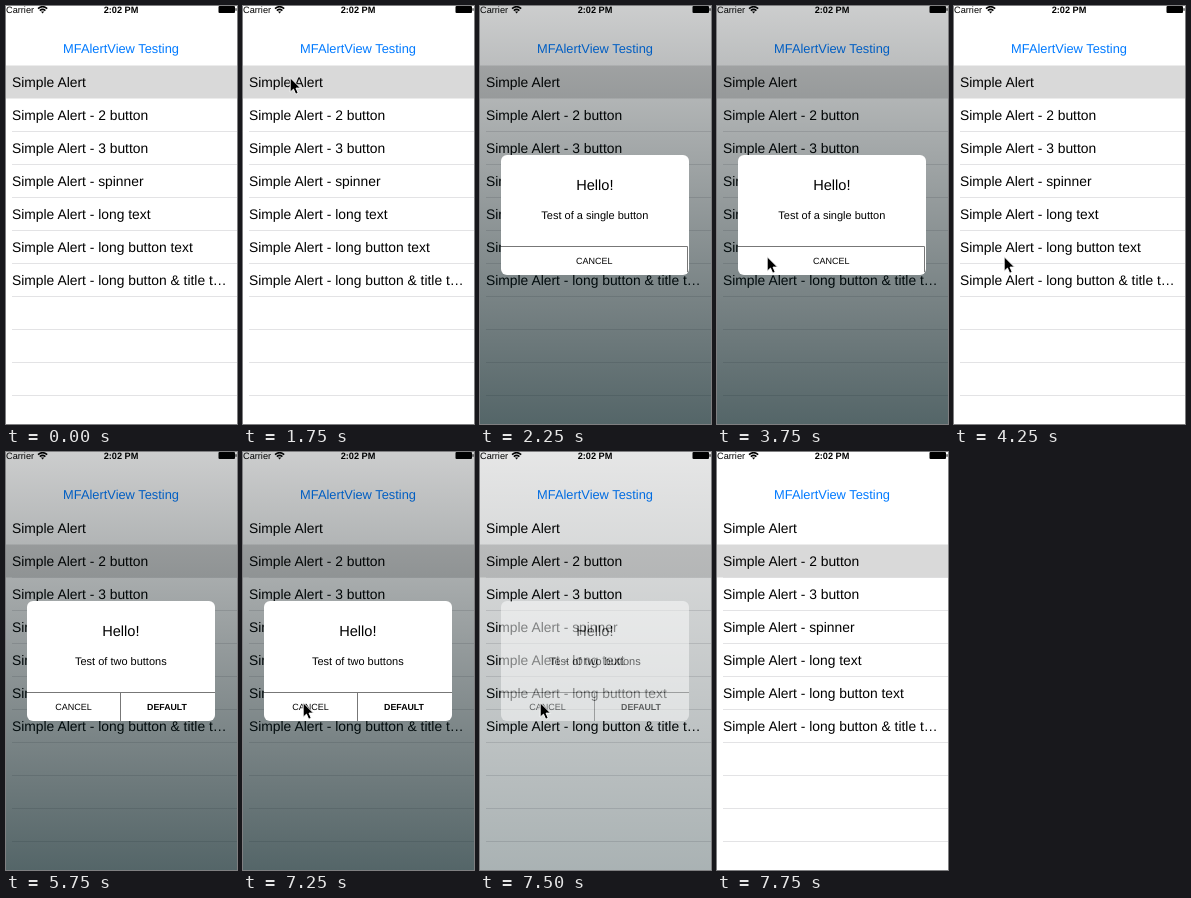
Write an HTML page that moves like this. It is 231x418 px and loops after 8 s.

```html
<!DOCTYPE html>
<html lang="en">
<head>
<meta charset="utf-8">
<title>Alert view demo</title>
<style>
  html, body { margin: 0; width: 100%; height: 100%; overflow: hidden; background: #fff; }
  svg { display: block; width: 231px; height: 418px; }
  text { font-family: "Liberation Sans", Arial, sans-serif; text-rendering: geometricPrecision; }
  .mid { text-anchor: middle; }
  .bold { font-weight: bold; }
</style>
</head>
<body>
<svg viewBox="0 0 231 418">
  <defs>
    <linearGradient id="shade" x1="0" y1="0" x2="0" y2="1">
      <stop offset="0" stop-color="#000608" stop-opacity=".2"/>
      <stop offset="1" stop-color="#001a1e" stop-opacity=".67"/>
    </linearGradient>
  </defs>
  <rect width="231" height="418" fill="#fff"/>
  <text x="0" y="7" font-size="9.2">Carrier</text>
  <g fill="none" stroke="#000" stroke-width="1.5">
    <path d="M32 2.6Q36.6 -1.4 41.2 2.6M33.8 4.6Q36.6 2.2 39.4 4.6"/>
    <path d="M35 5.6h3.2L36.6 7.4Z" fill="#000" stroke="none"/>
  </g>
  <text class="mid bold" x="115" y="7" font-size="9.2">2:02 PM</text>
  <rect x="212.5" width="16.5" height="7" rx="1"/>
  <rect x="229.5" y="2.2" width="1" height="2.6"/>
  <text class="mid" x="115" y="47" font-size="12.85" fill="#007aff">MFAlertView Testing</text>
  <g id="lines"></g>
  <rect id="highlight" width="231" height="33" fill="#d9d9d9"/>
  <g id="labels" font-size="13.85"></g>
  <rect id="dim" width="231" height="418" fill="url(#shade)"/>
  <g id="alert">
    <rect x="21" y="149" width="188" height="120" rx="6" fill="#fff"/>
    <text class="mid" x="114.8" y="184" font-size="14.6">Hello!</text>
    <text class="mid" id="message" x="114.8" y="213" font-size="11"></text>
    <path id="rules" fill="none" stroke="#777"/>
    <text class="mid" id="cancel" y="258" font-size="9">CANCEL</text>
    <text class="mid bold" id="default" x="161" y="258" font-size="8.8">DEFAULT</text>
  </g>
  <path id="cursor" d="M.7.7V15.2L4 12.1L6.2 17.2L8.7 16.1L6.5 11.1H11Z" stroke="#fff" stroke-width=".9"/>
</svg>
<script>
const LOOP = 8000, STEP = 250, ROW_TOP = 59, ROW_HEIGHT = 33;
const $ = id => document.getElementById(id);
const clamp = x => Math.max(0, Math.min(1, x));
const easeOut = u => 1 - (1 - u) ** 4;

function add(parent, tag, attrs, text = '') {
  const node = document.createElementNS('http://www.w3.org/2000/svg', tag);
  for (const key in attrs) node.setAttribute(key, attrs[key]);
  node.textContent = text;
  parent.append(node);
}

const rows = ['', ' - 2 button', ' - 3 button', ' - spinner', ' - long text',
  ' - long button text', ' - long button & title t…'];
rows.forEach((tail, i) =>
  add($('labels'), 'text', { x: 6, y: 81 + i * ROW_HEIGHT }, 'Simple Alert' + tail));
for (let i = 2; i <= 10; i++) {
  add($('lines'), 'rect', { x: 6, y: ROW_TOP + i * ROW_HEIGHT, width: 225, height: 1, fill: '#e3e3e5' });
}

// The pointer glides in, rests on its goal, then hides.
const visits = [
  { start: 750, arrive: 1750, end: 2250, from: [26, -7], to: [46.5, 71] },
  { start: 3250, arrive: 3750, end: 4500, from: [10, 238], to: [49.5, 250] },
  { start: 5000, arrive: 5250, end: 5750, from: [11, 108], to: [18.5, 106] },
  { start: 7000, arrive: 7250, end: 7750, from: [46, 247], to: [59.5, 250] }
];
const alerts = [
  { open: 2000, closed: 4250, fadeOut: STEP },
  { open: 5500, closed: 7750, fadeOut: 2 * STEP }
];

function drawCursor(t) {
  const visit = visits.find(v => t >= v.start && t < v.end);
  $('cursor').setAttribute('visibility', visit ? 'visible' : 'hidden');
  if (!visit) return;
  const { start, arrive, from, to } = visit;
  const k = easeOut(clamp((t - start) / (arrive - start)));
  const point = from.map((a, i) => a + (to[i] - a) * k);
  $('cursor').setAttribute('transform', `translate(${point})`);
}

function drawAlert(t) {
  const second = t >= alerts[1].open;
  const { open, closed, fadeOut } = alerts[+second];
  const shown = t < open ? 0 : clamp((closed - t) / fadeOut);
  const fadeIn = clamp((t - open + STEP) / (2 * STEP));

  $('highlight').setAttribute('y', ROW_TOP + .5 + second * ROW_HEIGHT);
  $('dim').setAttribute('opacity', shown);
  $('alert').setAttribute('opacity', shown * fadeIn);
  $('message').textContent = second ? 'Test of two buttons' : 'Test of a single button';
  $('rules').setAttribute('d', second ? 'M21 240.5H209M114.5 240V269' : 'M21 240.5H207.5V266');
  $('cancel').setAttribute('x', second ? 67.5 : 114.3);
  $('default').setAttribute('visibility', second ? 'visible' : 'hidden');
}

function render(elapsed) {
  const t = Math.floor((elapsed % LOOP) / STEP) * STEP;
  drawCursor(t);
  drawAlert(t);
}

let origin;
function tick(now) {
  origin ??= now;
  render(now - origin);
  requestAnimationFrame(tick);
}
render(0);
requestAnimationFrame(tick);
</script>
</body>
</html>
```
